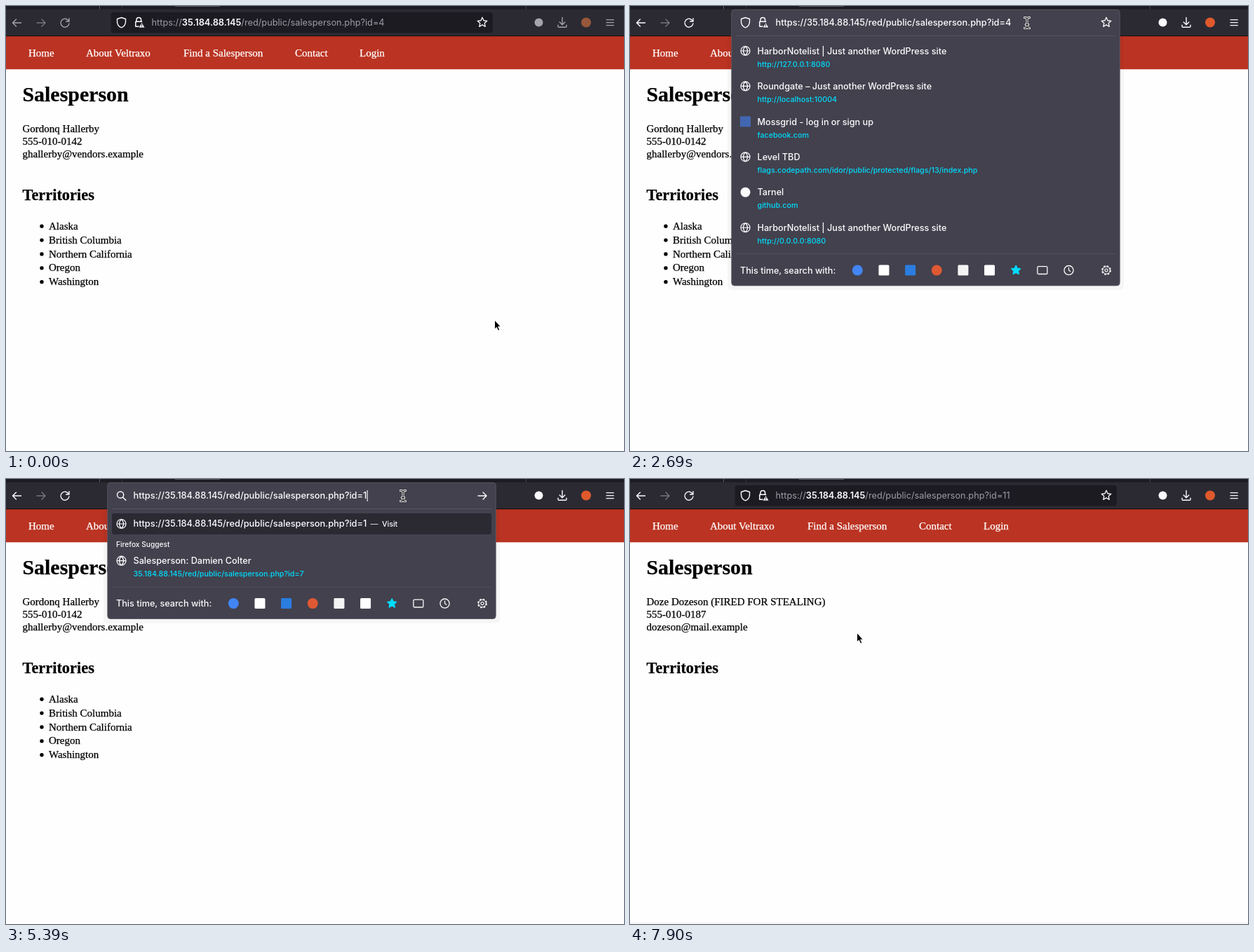
These frames come from a looping animation (881x635 px, 8 s). An HTML page:

```html
<!DOCTYPE html>
<html lang="en">
<head>
<meta charset="utf-8">
<title>Salesperson page</title>
<style>
html, body { margin: 0; width: 100%; height: 100%; overflow: hidden; background: #fff; }
svg { display: block; width: 881px; height: 635px; }
.ui { font-family: Inter, "Open Sans", sans-serif; font-weight: 500; }
.page { font-family: "Liberation Serif", "Times New Roman", serif; }
.page text { stroke-width: 0.25px; }
text { white-space: pre; }
</style>
</head>
<body>
<svg id="stage" viewBox="0 0 881 635" xmlns="http://www.w3.org/2000/svg"></svg>
<script>
const LOOP = 8000;
const URL_SIZE = 12.8;
const TITLE_SIZE = 12.65;
const WHITE = '#fbfbfe';
const GREY = '#9d9ca4';
const BASE = 'https://35.184.88.145/red/public/salesperson.php?';
const stage = document.getElementById('stage');
const pen = document.createElement('canvas').getContext('2d');

// Each step adds its changes to the state before it.
const steps = [
  [0, { cursor: ['arrow', 696, 448], active: false, focus: false, search: false, query: 'id=4',
        selected: false, caret: false, panel: '', loading: false, loaded: false, strip: false }],
  [450, { cursor: ['arrow', 697, 477] }],
  [600, { cursor: ['arrow', 598, 232] }],
  [750, { cursor: ['arrow', 471, 56] }],
  [1050, { cursor: ['beam', 512, 30] }],
  [1200, { cursor: ['beam', 533, 25] }],
  [1350, { cursor: ['beam', 535, 25], active: true, focus: true }],
  [1500, { cursor: ['beam', 552, 28], selected: true }],
  [1640, { cursor: ['beam', 567, 30] }],
  [1790, { cursor: ['beam', 567, 24], panel: 'top' }],
  [1940, { cursor: ['beam', 566, 24] }],
  [2090, { selected: false, caret: true }],
  [2690, { caret: false }],
  [3290, { search: true, query: 'id=', caret: true, panel: 'long' }],
  [3590, { query: 'id' }],
  [3890, { caret: false }],
  [4340, { caret: true }],
  [4790, { query: 'id=' }],
  [4940, { panel: 'short' }],
  [5240, { query: 'id=1' }],
  [5540, { query: 'id=11', panel: 'bare' }],
  [6110, { panel: '', caret: false, loading: true }],
  [6260, { loading: false, loaded: true, focus: false, search: false }],
  [6700, { strip: true }],
  [7750, { cursor: ['arrow', 440, 128] }],
  [7900, { cursor: ['arrow', 323, 219.5] }]
];
const states = [];
steps.forEach(([at, change], i) => states.push({ ...states[i - 1], ...change, at }));

const text = (x, y, s, size, fill, extra = '') =>
  `<text x="${x}" y="${y}" font-size="${size}" fill="${fill}" ${extra}>${s}</text>`;
const rect = (x, y, w, h, fill, rx = 0, extra = '') =>
  `<rect x="${x}" y="${y}" width="${w}" height="${h}" rx="${rx}" fill="${fill}" ${extra}/>`;
const dot = (x, y, r, fill) => `<circle cx="${x}" cy="${y}" r="${r}" fill="${fill}"/>`;
const line = (d, color, w = 1.4) =>
  `<path d="${d}" fill="none" stroke="${color}" stroke-width="${w}" stroke-linecap="round" stroke-linejoin="round"/>`;
const at = (x, y, body) => `<g transform="translate(${x} ${y})">${body}</g>`;

function widthOf(s) {
  pen.font = `500 ${URL_SIZE}px Inter, "Open Sans", sans-serif`;
  return pen.measureText(s).width;
}

function starPath(outer, inner) {
  const points = Array.from({ length: 10 }, (_, i) => {
    const r = i % 2 ? inner : outer, a = Math.PI * (i / 5 - 0.5);
    return `${(r * Math.cos(a)).toFixed(2)} ${(r * Math.sin(a)).toFixed(2)}`;
  });
  return `M${points.join('L')}Z`;
}

const icon = {
  right: c => line('M-6 0H6M1 -5L6 0L1 5', c),
  left: c => line('M6 0H-6M-1 -5L-6 0L-1 5', c),
  reload: c => line('M5.4 -2.6A6 6 0 1 0 6 1M6 -6.3V-2H1.7', c),
  stop: c => line('M-5 -5L5 5M5 -5L-5 5', c, 1.5),
  shield: c => line('M0 -7L6 -5V-1C6 3 3.5 6 0 7.4C-3.5 6 -6 3 -6 -1V-5Z', c),
  lock: c => line('M-4 -1V-3.7A3.2 3.2 0 0 1 2.6 -3.7V-1', c, 1.5) +
    line('M-0.5 5.8H-5.2V-1.2H3.6', c, 1.5) +
    `<path d="M3.6 -0.2L8 7.6H-0.9Z" fill="${c}" stroke="#2b2a33" stroke-width="0.9"/>` +
    line('M3.6 2.7V4.6M3.6 6.2V6.3', '#2b2a33', 1),
  lens: c => `<circle cx="-1.4" cy="-1.4" r="4.6" fill="none" stroke="${c}" stroke-width="1.4"/>` + line('M2 2L6.3 6.3', c, 1.5),
  star: c => line(starPath(7.2, 3.4), c, 1.3),
  download: c => line('M0 -7V3M-3.8 -0.6L0 3.2L3.8 -0.6M-6 3.6V5.5Q-6 6.8 -4.7 6.8H4.7Q6 6.8 6 5.5V3.6', c),
  menu: c => line('M-5 -4.3H5.2M-5 -0.3H5.2M-5 3.7H5.2', c, 1.3),
  globe: c => line('M-6.5 0A6.5 6.5 0 1 0 6.5 0A6.5 6.5 0 1 0 -6.5 0M-6.5 0H6.5M0 -6.5C-4 -3 -4 3 0 6.5C4 3 4 -3 0 -6.5', c, 1.2),
  clock: c => `<circle r="6.6" fill="none" stroke="${c}" stroke-width="1.3"/>` + line('M0 -3.8V0L2.3 1.7', c, 1.2),
  tab: c => rect(-7, -5.4, 14, 10.8, 'none', 1.6, `stroke="${c}" stroke-width="1.3"`),
  gear: c => `<circle r="6" fill="none" stroke="${c}" stroke-width="1.8" stroke-dasharray="2.6 2.112"/>` +
    `<circle r="5.2" fill="none" stroke="${c}" stroke-width="1"/><circle r="2.1" fill="none" stroke="${c}" stroke-width="1.2"/>`
};

function page(s) {
  const nav = [[32, 'Home'], [114, 'About Veltraxo'], [253, 'Find a Salesperson'], [412, 'Contact'], [504, 'Login']];
  const person = s.loaded
    ? ['Doze Dozeson (FIRED FOR STEALING)', '555-010-0187', 'dozeson@mail.example']
    : ['Gordonq Hallerby', '555-010-0142', 'ghallerby@vendors.example'];
  const places = s.loaded ? [] : ['Alaska', 'British Columbia', 'Northern California', 'Oregon', 'Washington'];
  return '<g class="page">' + rect(0, 43, 881, 592, '#fefefe') + rect(0, 43, 881, 47.3, '#bb3322') +
    '<g stroke="#fff">' + nav.map(([x, label]) => text(x, 72, label, 15, '#fff')).join('') + '</g>' +
    places.map((_, i) => dot(51, 314.2 + i * 19.9, 2.7, '#000')).join('') +
    '<g stroke="#000">' + text(23.5, 136, 'Salesperson', 29.9, '#000', 'font-weight="700"') +
    person.map((row, i) => text(23.5, 179.7 + i * 18.2, row, 15, '#000')).join('') +
    text(23.5, 277, 'Territories', 22.4, '#000', 'font-weight="700"') +
    places.map((row, i) => text(61, 318.7 + i * 19.9, row, 15, '#000')).join('') +
    '</g></g>' + (s.strip ? rect(0, 632, 881, 3, '#f7f7f7') : '');
}

function toolbar(s) {
  const c = s.active ? WHITE : '#a5a4aa';
  return rect(0, 0, 881, 5, '#1c1b22') + rect(0, 4.5, 881, 38, '#2b2a33') + rect(0, 42, 881, 1.2, '#101014') +
    rect(133, 0, 1, 4.5, '#5b5a62') + rect(165, 0, 1, 4.5, '#33323a') +
    rect(241, 0, 64, 1, '#5b5a62') + rect(741, 0, 1, 4.5, '#45444c') +
    at(15.5, 24, icon.left(c)) + at(50, 24, icon.right('#77767e')) +
    at(84, 24, s.loading ? icon.stop(c) : icon.reload(c)) +
    dot(759.5, 23.5, 6, c) + at(793, 23.5, icon.download(c)) +
    dot(827, 23.5, 7, s.active ? '#e0592c' : '#98573a') + at(861, 24, icon.menu(c));
}

function address(s) {
  const x = s.search ? 181.5 : 207.5;
  const url = BASE + s.query;
  const end = x + widthOf(url);
  let out = s.panel ? '' : rect(149.5, 9, 544.5, 29.5, s.focus ? '#42414d' : '#1c1b22', 4);
  out += s.search
    ? at(164.5, 24, icon.lens(WHITE)) + at(679, 24, icon.right(WHITE))
    : at(164.5, 23.5, icon.shield(WHITE)) + at(190, 23.5, icon.lock(WHITE)) + at(679, 23.5, icon.star(WHITE));
  if (s.selected) {
    const from = x + widthOf(url.slice(0, -1));
    out += rect(from, 16, end - from, 16, '#3c72a3');
  }
  if (s.focus) {
    out += text(x, 28.4, url, URL_SIZE, WHITE);
  } else {
    const host = `<tspan fill="${WHITE}" font-weight="600">35.184.88.145</tspan>`;
    out += text(x, 28.4, url.replace('35.184.88.145', host), 12.75, GREY, 'font-weight="400"');
  }
  if (s.caret) out += rect(end + 0.2, 16, 1.1, 16, WHITE);
  return out;
}

const BLOG = 'HarborNotelist | Just another WordPress site';
const rows = {
  local: [BLOG, 'http://127.0.0.1:8080'],
  older: ['Roundgate – Just another WordPress site', 'http://localhost:10004'],
  social: ['Mossgrid - log in or sign up', 'facebook.com', rect(-7.5, -7.5, 15, 15, '#4267b2')],
  level: ['Level TBD', 'flags.codepath.com/idor/public/protected/flags/13/index.php'],
  code: ['Tarnel', 'github.com', dot(0, 0, 7, WHITE)],
  zero: [BLOG, 'http://0.0.0.0:8080'],
  seller: ['Salesperson: Damien Colter', '35.184.88.145/red/public/salesperson.php?id=7']
};
const panels = {
  top: { rows: ['local', 'older', 'social', 'level', 'code', 'zero'], first: 64, rule: 353.5 },
  long: { rows: ['seller', 'social', 'level', 'code', 'zero'], first: 116.7, rule: 356 },
  short: { rows: ['seller'], first: 116.7, rule: 154 },
  bare: { rows: [], first: 0, rule: 84.5 }
};

function visitRow(s) {
  const url = BASE + s.query;
  const x = 181.5 + widthOf(url);
  return rect(151, 49, 541, 30, '#2b2a33', 3) + at(164.5, 64, icon.globe(WHITE)) +
    text(181.5, 68.4, url, URL_SIZE, WHITE) + text(x + 5, 68, '—', 11, '#cfcfd8') +
    text(x + 21.5, 68, 'Visit', 10.7, WHITE);
}

function engines(y) {
  const square = c => rect(-7.5, -7.5, 15, 15, c, 1.5);
  const marks = [dot(0, 0, 7.5, '#4285f4'), square('#fff'), square('#2b7de0'), dot(0, 0, 7.5, '#de5833'),
    square('#f4f4f4'), square('#fff'),
    `<path d="${starPath(7.2, 3.6)}" fill="#00ddff" stroke="#00ddff" stroke-linejoin="round"/>`,
    icon.tab(WHITE), icon.clock(WHITE)];
  return text(157, y + 4.6, 'This time, search with:', TITLE_SIZE, WHITE) +
    marks.map((mark, i) => at(324.3 + i * 37.65, y, mark)).join('') + at(679, y, icon.gear(WHITE));
}

function panel(s) {
  const p = panels[s.panel];
  if (!p) return '';
  const bottom = p.rule + 45.5;
  let out = rect(139, 43, 565, bottom - 37, '#000', 5, 'opacity="0.03"') +
    rect(144.8, 5.3, 553.4, bottom - 5.3, '#42414d', 4, 'stroke="#5a5965" stroke-width="0.9"') +
    rect(151, 42, 541, 1, '#555460') + rect(151, p.rule - 0.5, 541, 1, '#504f5a');
  if (s.search) out += visitRow(s);
  if (s.search && p.rows.length) out += text(157, 97, 'Firefox Suggest', 10.2, WHITE);
  p.rows.forEach((key, i) => {
    const [title, link, mark] = rows[key];
    const y = p.first + i * 50.45;
    out += at(164.5, y, mark || icon.globe(WHITE)) + text(181.5, y + 4.6, title, TITLE_SIZE, WHITE) +
      text(181.5, y + 22.6, link, 10.72, '#00ddff');
  });
  return out + engines(p.rule + 23.6);
}

function pointer([kind, x, y]) {
  if (kind === 'arrow') {
    return at(x, y, '<path d="M0.5 0V13.2L3.4 10.5L5.5 15.3L7.8 14.3L5.7 9.7H9.4Z" fill="#000" stroke="#fff" stroke-width="1" stroke-linejoin="round"/>');
  }
  const beam = 'M-3.5 -7.5Q0 -7.5 0 -5.5Q0 -7.5 3.5 -7.5M0 -5.5V5.5M-3.5 7.5Q0 7.5 0 5.5Q0 7.5 3.5 7.5M-1.8 2.5H1.8';
  return at(x, y, line(beam, '#fff', 3) + line(beam, '#111', 1.2));
}

function status(s) {
  return s.loading ? rect(-4, 624, 76, 16, '#2b2a33', 3) + text(-2, 636.5, '35.184.88.145', 10.3, WHITE) : '';
}

let shown = null;
function draw(now) {
  const t = now % LOOP;
  const s = states.findLast(state => state.at <= t);
  if (s !== shown) {
    shown = s;
    stage.innerHTML = page(s) +
      `<g class="ui">${toolbar(s)}${panel(s)}${address(s)}${status(s)}</g>` + pointer(s.cursor);
  }
  requestAnimationFrame(draw);
}
draw(0);
</script>
</body>
</html>
```
